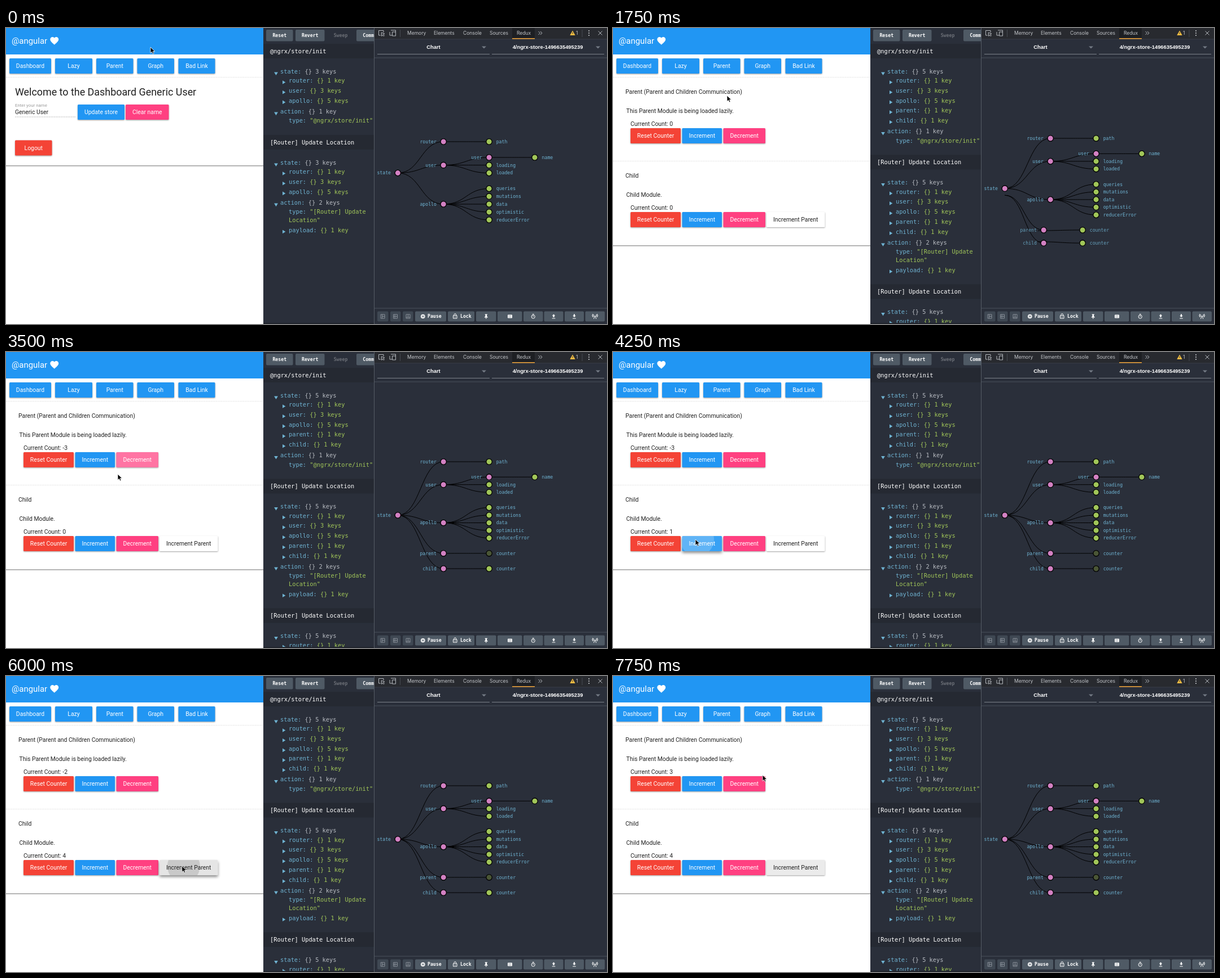
An HTML page that plays this animation: 1065 px wide and 526 px high, repeating every 8000 ms.

```html
<!DOCTYPE html>
<html lang="en">
<head>
<meta charset="utf-8">
<title>Store inspector demo</title>
<style>
html, body { margin: 0; width: 100%; height: 100%; overflow: hidden; background: #fff; }
svg { display: block; }
text { font: 10.4px Roboto, sans-serif; fill: #212121; white-space: pre; }
.w { fill: #fff; }
.mid { text-anchor: middle; }
.end { text-anchor: end; }
.title { font-size: 17.9px; }
.brand { font-size: 14.9px; fill: #fff; }
.hint { font-size: 7.85px; fill: #9a9a9a; }
.tree { font: 10.33px "DejaVu Sans Mono", monospace; fill: #6fb3d2; }
.tree .v { fill: #a1c659; }
.tree .o { fill: #b8bcc2; }
.tree.head { fill: #fff; }
.node { font: 8.17px "DejaVu Sans Mono", monospace; fill: #6fb3d2; }
.tool { font: bold 8.2px "DejaVu Sans Mono", monospace; fill: #fff; }
.tab { font: 8.5px Inter, sans-serif; fill: #c3c6ca; }
.pick { font: bold 9.35px "Liberation Sans", sans-serif; fill: #fff; text-anchor: middle; }
.low { filter: drop-shadow(0 1px 1px rgba(0,0,0,.38)); }
.high { filter: drop-shadow(0 3px 2.5px rgba(0,0,0,.45)); }
.line { fill: none; stroke: #fff; stroke-width: 1; }
.link { fill: none; stroke: #000; stroke-width: 1; }
</style>
</head>
<body>
<svg id="stage" width="1065" height="526" viewBox="0 0 1065 526">
  <g id="page"></g>
  <g id="log"></g>
  <g id="tools"></g>
  <g id="graph"></g>
  <g id="cursor"><path d="M0 0V10.6L2.5 8.3L4.1 12L6 11.2L4.4 7.6H7.8Z" fill="#000" stroke="#fff" stroke-width=".8"/></g>
</svg>
<script>
const LOOP = 8000, STEP = 250;
const BLUE = '#2196f3', RED = '#f44336', PINK = '#ff4081';
const BG = '#2a2f3a', BAND = '#252932', KEY = '#4f5a65';
const $ = id => document.getElementById(id);

const rect = (x, y, w, h, fill, more = '') =>
  `<rect x="${x}" y="${y}" width="${w}" height="${h}" fill="${fill}" ${more}/>`;
const text = (x, y, s, cls = '') => `<text x="${x}" y="${y}" class="${cls}">${s}</text>`;
const path = (d, more = 'class="line"') => `<path d="${d}" ${more}/>`;

// ---- timelines ----
const cursorKeys = [
  [0, 256, 34], [250, 240, 44], [500, 212, 59], [750, 189, 71], [1500, 189, 71],
  [1750, 202, 120], [2000, 225, 180], [2250, 232, 197], [3250, 232, 197],
  [3500, 198, 217], [3750, 168, 286], [4000, 146, 333], [5250, 146, 333],
  [5500, 225, 341], [5750, 312, 338], [7500, 311, 337], [7750, 265, 176]
];

// time, button, ripple radius, overlay alpha, raised
const pressKeys = [
  [0, '', 0, 0, 0], [750, 'Parent', 0, 0, 1], [1000, 'Parent', 24, .1, 1],
  [1250, 'Parent', 0, .2, 1], [1500, 'Parent', 0, .1, 1], [1750, '', 0, 0, 0],
  [2250, 'pDec', 0, 0, 1], [2500, 'pDec', 32, .05, 1], [2750, 'pDec', 36, .15, 1],
  [3000, 'pDec', 32, .15, 1], [3250, 'pDec', 38, .15, 1], [3500, 'pDec', 0, .27, 0],
  [4000, 'cInc', 0, 0, 1], [4250, 'cInc', 30, .1, 1], [4500, 'cInc', 36, .12, 1],
  [4750, 'cInc', 32, .12, 1], [5000, 'cInc', 37, .12, 1], [5250, 'cInc', 40, .15, 1],
  [5500, 'cInc', 0, .12, 0], [5750, 'up', 0, 0, 1], [6000, 'up', 29, .1, 1],
  [6250, 'up', 36, .1, 1], [6500, 'up', 30, .1, 1], [6750, 'up', 38, .1, 1],
  [7000, 'up', 30, .1, 1], [7250, 'up', 38, .1, 1], [7500, 'up', 0, .12, 1],
  [7750, 'up', 0, .08, 0]
];
const parentCount = [[0, 0], [2750, -1], [3000, -2], [3250, -3], [6000, -2],
  [6250, -1], [6500, 0], [6750, 1], [7000, 2], [7250, 3]];
const childCount = [[0, 0], [4250, 1], [4500, 2], [4750, 3], [5250, 4]];
const parentDot = [[0, '#a1c659'], [2750, '#4a5636']];
const childDot = [[0, '#a1c659'], [4250, '#4a5636'], [5000, '#6f8944'], [5500, '#a1c659']];

const at = (keys, t) => keys.filter(k => k[0] <= t).pop();

function cursorAt(t) {
  const a = at(cursorKeys, t), b = cursorKeys.find(k => k[0] > t) || a;
  const p = a === b ? 0 : (t - a[0]) / (b[0] - a[0]);
  return [a[1] + (b[1] - a[1]) * p, a[2] + (b[2] - a[2]) * p];
}

// ---- web page ----
function button(id, x, y, w, label, fill, press, tip) {
  const on = press[1] === id, ink = fill === '#fff' ? '#000' : '#fff';
  let s = `<g class="${on && press[4] ? 'high' : 'low'}">${rect(x, y, w, 27, fill, 'rx="1.5"')}</g>`;
  if (on) {
    s += `<svg x="${x}" y="${y}" width="${w}" height="27">` +
      rect(0, 0, w, 27, ink, `rx="1.5" opacity="${press[3]}"`) +
      `<circle cx="${tip[0] - x + 3}" cy="${tip[1] - y}" r="${press[2]}" fill="${ink}" opacity="${ink === '#000' ? .12 : .2}"/></svg>`;
  }
  return s + text(x + w / 2, y + 17.2, label, 'mid' + (ink === '#fff' ? ' w' : ''));
}

const rule = y => path(`M0 ${y}H456`, 'stroke="#ddd" stroke-width=".8" stroke-dasharray="2 1"');

function counterRow(y, prefix, count, make) {
  return text(31, y - 4, 'Current Count: ' + count) +
    make(prefix + 'Reset', 31, y, 89, 'Reset Counter', RED) +
    make(prefix + 'Inc', 122.5, y, 70.5, 'Increment', BLUE) +
    make(prefix + 'Dec', 195.5, y, 74.5, 'Decrement', PINK);
}

function drawPage(t, tip) {
  const press = at(pressKeys, t), inside = t >= 1000;
  const make = (id, x, y, w, label, fill) => button(id, x, y, w, label, fill, press, tip);
  let s = rect(0, 0, 456, 526, '#fff') +
    rect(-5, 40, 466, inside ? 346 : 204, '#fff', 'style="filter:drop-shadow(0 1px 1px rgba(0,0,0,.55))"') +
    rect(0, 0, 456, 47, BLUE) + text(10, 28, '@angular', 'brand') +
    path('M12 21.35l-1.45-1.32C5.4 15.36 2 12.28 2 8.5 2 5.42 4.42 3 7.5 3c1.74 0 3.41.81 4.5 2.09C13.09 3.81 14.76 3 16.5 3 19.58 3 22 5.42 22 8.5c0 3.78-3.4 6.86-8.55 11.54z',
      'fill="#fff" transform="translate(76.8 13.8) scale(.745)"') +
    rule(87.5);
  [['Dashboard', 6, 74], ['Lazy', 87, 66], ['Parent', 160, 65.5], ['Graph', 232.5, 65.5], ['Bad Link', 305.5, 65]]
    .forEach(([name, x, w]) => s += make(name, x, 54, w, name, BLUE));
  if (!inside) {
    return s + text(16, 119.5, 'Welcome to the Dashboard Generic User', 'title') +
      text(16, 139.5, 'Enter your name', 'hint') + text(16, 153, 'Generic User') +
      path('M16 158H124', 'stroke="#aaa" stroke-width=".8" stroke-dasharray="2 1"') +
      make('update', 127, 136, 83, 'Update store', BLUE) +
      make('clear', 212, 136, 76.5, 'Clear name', PINK) +
      make('logout', 16, 199.5, 65.5, 'Logout', RED);
  }
  return s + text(22, 117, 'Parent (Parent and Children Communication)') +
    text(23.5, 151, 'This Parent Module is being loaded lazily.') +
    counterRow(178, 'p', at(parentCount, t)[1], make) + rule(236.5) +
    text(22, 266, 'Child') + text(23.5, 300, 'Child Module.') +
    counterRow(327, 'c', at(childCount, t)[1], make) +
    make('up', 272, 327, 103.5, 'Increment Parent', '#fff');
}

// ---- action log ----
const arrow = (x, y, open) => path(open
  ? `M${x - 3.4} ${y}h6.8l-3.4 5.6z` : `M${x - 2.5} ${y - .5}v6.6l5.4 -3.3z`, 'fill="#6fb3d2"');
const span = (c, s) => `<tspan class="${c}">${s}</tspan>`;
const size = n => `{} ${n} key${n > 1 ? 's' : ''}`;

function logItem(y, name, keys, update) {
  let s = rect(456, y - 13, 196, 26, BAND) + text(468, y + 3.6, name, 'tree head');
  const parent = (label, n) => s += arrow(478.5, y + 1.3, true) +
    text(486, y + 3.6, label + ': ' + span('o', size(n)), 'tree');
  const child = (label, n) => s += arrow(492.5, y, false) +
    text(501, y + 3.6, label + ': ' + span('v', size(n)), 'tree');
  y += 36.2;
  parent('state', keys.length);
  keys.forEach(([label, n], i) => { y += i ? 17.7 : 16.5; child(label, n); });
  y += 19.2;
  parent('action', update ? 2 : 1);
  y += 16.3;
  s += text(501, y + 3.6, 'type: ' + span('v', update ? '"[Router] Update' : '"@ngrx/store/init"'), 'tree');
  if (update) {
    y += 14.6;
    s += text(501, y + 3.6, span('v', 'Location"'), 'tree');
    y += 18;
    child('payload', 1);
  }
  return [s, y + 38.4];
}

const toolKey = (x, y, w, h, label, fill = KEY) => rect(x, y, w, h, fill, 'rx="2"') +
  text(x + w / 2, y + h / 2 + 3, label, 'tool mid');

function drawLog(loaded) {
  const keys = [['router', 1], ['user', 3], ['apollo', 5]];
  if (loaded) keys.push(['parent', 1], ['child', 1]);
  let s = '<svg x="0" y="0" width="652" height="526">' + rect(456, 0, 196, 526, BG), y = 41;
  for (let i = 0; y < 540 && i < (loaded ? 3 : 2); i++) {
    const [part, next] = logItem(y, i ? '[Router] Update Location' : '@ngrx/store/init', keys, i > 0);
    s += part;
    y = next;
  }
  return s + rect(456, 0, 196, 28, BG) + toolKey(461, 3, 47.5, 20.5, 'Reset') +
    toolKey(513, 3, 51.5, 20.5, 'Revert') +
    `<g opacity=".3">${text(593, 16.2, 'Sweep', 'tool mid')}</g>` +
    toolKey(621, 3, 52, 20.5, 'Commit') + rect(456, 524, 196, 2, '#20242c') + '</svg>';
}

// ---- inspector frame ----
function drawTools() {
  let s = rect(652, 0, 413, 526, BG) + rect(653, 0, 412, 19.5, '#282a2f') +
    rect(653, 19.5, 412, .8, '#3d4149') + rect(652, 0, 1, 526, '#555c66') +
    rect(897, 0, 40, 19, '#1d1f23') + rect(897, 18, 40, 1.6, '#e9a13b');
  [['Memory', 711], ['Elements', 758], ['Console', 810], ['Sources', 857], ['Redux', 905]]
    .forEach(([name, x]) => s += text(x, 12, name, 'tab' + (name === 'Redux' ? ' w' : '')));
  const grey = 'fill="none" stroke="#b4b8bd" stroke-width="1"';
  s += path('M669 8V4.5H660.5V13H664M665 8l6 2.3-2.6 1 2 2.3-1.2 1-2-2.3-1.4 2.2z', grey) +
    path('M684 13H680V7M682 4H690.5V7M684.5 7H690.5V14H684.5z', grey) +
    path('M698.5 3V16M1021 3V16', 'stroke="#464a52"') +
    path('M943.5 6l3 3-3 3M947 6l3 3-3 3M1049.5 5.5l7 7M1056.5 5.5l-7 7', grey) +
    path('M1004 4.5l4.7 8.5h-9.4z', 'fill="#f2bd42"') + rect(1003.5, 7.5, 1, 3, '#333') +
    text(1010, 12, '1', 'tab');
  [5, 9, 13].forEach(y => s += `<circle cx="1033" cy="${y}" r="1.1" fill="#c3c6ca"/>`);
  s += text(757.5, 37.3, 'Chart', 'pick') + text(960, 37.3, '4/ngrx-store-1496635495239', 'pick') +
    rect(658, 46, 199, .9, '#868c95') + rect(861, 46, 199, .9, '#868c95') +
    path('M843 32.5h8l-4 4zM1045 32.5h8l-4 4z', 'fill="#737a84"') +
    rect(653, 52.5, 412, 1, '#4b525d') + rect(653, 497.5, 412, 1, '#4b525d');
  [[658, 19.5], [681, 18.5], [703, 18.5], [725, 55], [783, 47], [833, 35.5], [871, 43.5],
   [917, 34.5], [953.5, 34], [990, 34], [1026.5, 34.5]]
    .forEach(([x, w], i) => s += rect(x, 503.5, w, 18, i < 3 ? '#3f4853' : KEY, 'rx="2"'));
  const faint = 'fill="none" stroke="#8f969f" stroke-width=".9"';
  [664, 686.5, 709].forEach((x, i) => s += path(`M${x} 509h7v7h-7z` +
    ['m2.5 0v7m0 -3.5h4.5', 'm0 3.5h7m-4.5 -3.5v7', 'm0 5h7m-3.5 -5v5'][i], faint));
  s += '<circle cx="738.8" cy="512.5" r="3.8" fill="#fff"/>' +
    rect(737.1, 510.7, 1.2, 3.6, KEY) + rect(739.4, 510.7, 1.2, 3.6, KEY) +
    text(747, 515.4, 'Pause', 'tool') + text(805, 515.4, 'Lock', 'tool') +
    path('M792.5 511h6.5v5h-6.5zM794 511v-1.5a1.8 1.8 0 0 1 3.6 0v1.5M795.7 513v1.5') +
    path('M848.7 508.5h4.2v1l-.8 .5v2.3l1.7 1.4v.8h-2.5v2.6h-1v-2.6h-2.5v-.8l1.7-1.4v-2.3l-.8-.5z', 'class="w"') +
    rect(889, 509.5, 8, 6, '#fff', 'rx=".8"') +
    path('M890.5 511.3h5M890.5 513.8h5', `stroke="${KEY}" stroke-dasharray="1 .8"`) +
    '<circle cx="934.2" cy="513" r="3.1" class="line"/>' +
    path('M932.8 508.5h2.8M934.2 511v2.2') +
    path('M970.5 508.5l2.8 3h-1.7v2.5h-2.2v-2.5h-1.7zM967.7 515.5h5.6v1.1h-5.6z', 'class="w"') +
    path('M1007 514l2.8-3h-1.7v-2.5h-2.2v2.5h-1.7zM1004.2 515.5h5.6v1.1h-5.6z', 'class="w"') +
    path('M1043.7 511l-2.2 6M1043.7 511l2.2 6M1041.6 509a3 3 0 0 0 0 4M1045.8 509a3 3 0 0 1 0 4M1040 508a5 5 0 0 0 0 6M1047.4 508a5 5 0 0 1 0 6');
  return s;
}

// ---- state tree: label, parent index, column, y before, y after ----
const nodes = [
  ['state', -1, 0, 257.6, 290], ['router', 0, 1, 202, 195], ['user', 0, 1, 243.7, 235.7],
  ['apollo', 0, 1, 313, 303.5], ['path', 1, 2, 202, 195], ['user', 2, 2, 230, 222.2],
  ['loading', 2, 2, 243.7, 235.7], ['loaded', 2, 2, 257.6, 249.3], ['name', 5, 3, 230, 222.2],
  ['queries', 3, 2, 285.4, 276.4], ['mutations', 3, 2, 299.2, 290], ['data', 3, 2, 313, 303.5],
  ['optimistic', 3, 2, 327, 317], ['reducerError', 3, 2, 341, 330.6],
  ['parent', 0, 1, 0, 357.8], ['child', 0, 1, 0, 385],
  ['counter', 14, 2, 0, 357.8], ['counter', 15, 2, 0, 385]
];
const ENTER = { x: 694.3, y: 366 }, FIRST_NEW = 14;
const ease = p => p < .5 ? 4 * p ** 3 : 1 - 4 * (1 - p) ** 3;

function drawGraph(t) {
  const p = ease(Math.min(1, Math.max(0, (t - 1250) / 750)));
  const mix = (a, b) => a + (b - a) * p;
  const shown = t < 1250 ? nodes.slice(0, FIRST_NEW) : nodes;
  const pos = shown.map(([, , col, y0, y1], i) => {
    const x = 694.3 + col * 80.9;
    return i < FIRST_NEW ? { x, y: mix(y0, y1) } : { x: mix(ENTER.x, x), y: mix(ENTER.y, y1) };
  });
  let links = '', dots = '';
  shown.forEach(([label, up], i) => {
    const { x, y } = pos[i], fresh = i >= FIRST_NEW;
    if (up >= 0) {
      const a = fresh ? { x: mix(ENTER.x, pos[up].x), y: mix(ENTER.y, pos[up].y) } : pos[up];
      const m = (a.x + x) / 2;
      links += path(`M${a.x} ${a.y}C${m} ${a.y} ${m} ${y} ${x} ${y}`, 'class="link"');
    }
    const branch = nodes.some(n => n[1] === i);
    const fill = branch ? '#d381c3' : i === 16 ? at(parentDot, t)[1] : i === 17 ? at(childDot, t)[1] : '#a1c659';
    dots += `<circle cx="${x}" cy="${y}" r="5.2" fill="${fill}" stroke="#000" stroke-width="1.3"/>` +
      `<g opacity="${fresh ? p : 1}">${text(x + (branch ? -12.3 : 12.6), y + 2.8, label, 'node' + (branch ? ' end' : ''))}</g>`;
  });
  return links + dots;
}

// ---- playback ----
$('tools').innerHTML = drawTools();
let shownStep = -1, shownLog = null;

function render(t) {
  const tip = cursorAt(t), loaded = t >= 1250;
  $('page').innerHTML = drawPage(t, tip);
  if (loaded !== shownLog) $('log').innerHTML = drawLog(shownLog = loaded);
  $('graph').innerHTML = drawGraph(t);
  $('cursor').setAttribute('transform', `translate(${tip})`);
}

const start = performance.now();
function tick() {
  const step = Math.floor(((performance.now() - start) % LOOP) / STEP);
  if (step !== shownStep) render((shownStep = step) * STEP);
  requestAnimationFrame(tick);
}
tick();
</script>
</body>
</html>
```
